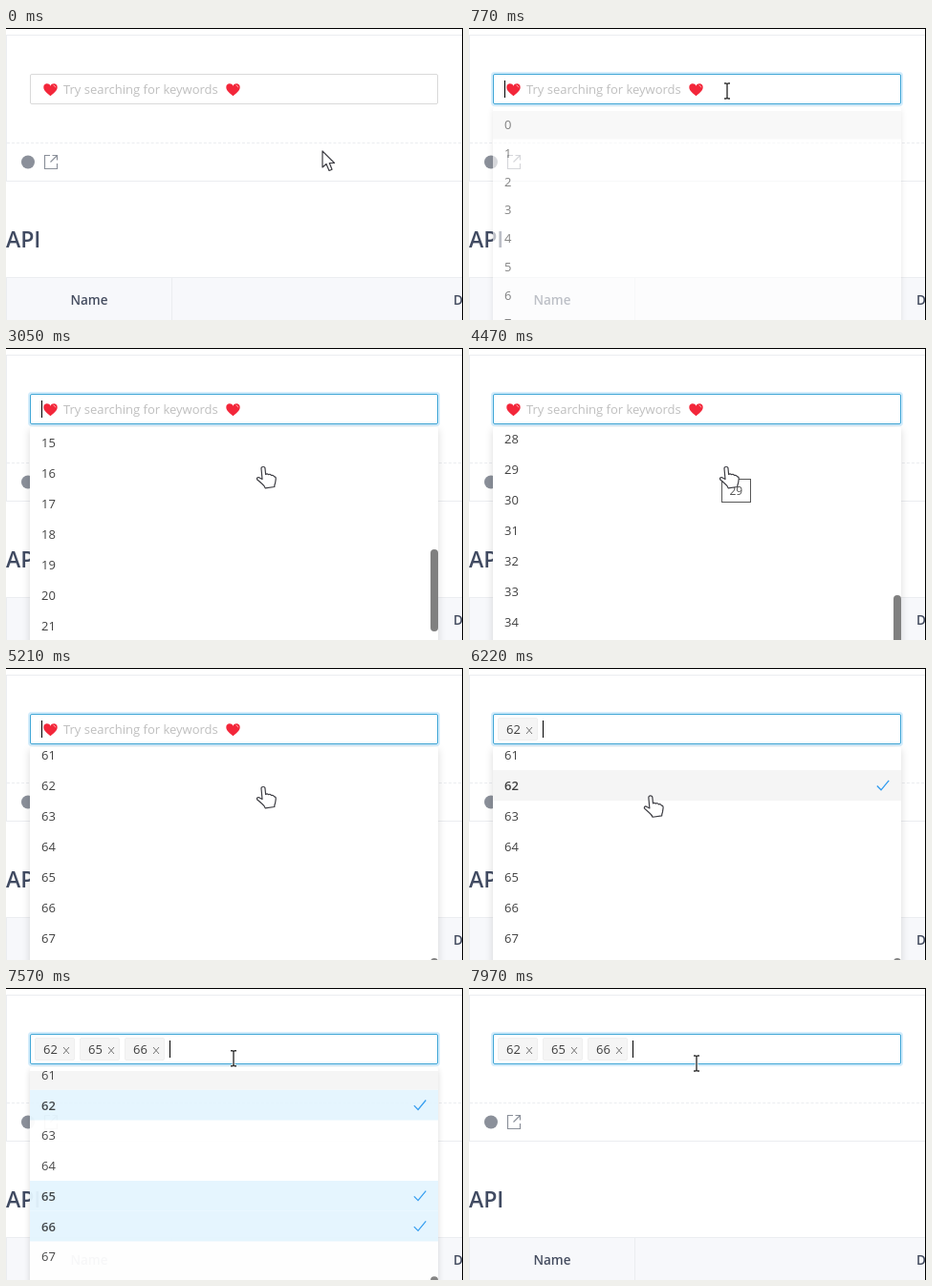
Write an HTML page that moves like this. It is 478 px wide and 306 px high and loops after 8000 ms.

```html
<!DOCTYPE html>
<html lang="en">
<head>
<meta charset="utf-8">
<title>Multi select with endless options</title>
<style>
  html, body { margin: 0; width: 100%; height: 100%; overflow: hidden; background: #fff; }
  #stage { position: relative; width: 478px; height: 306px; overflow: hidden; background: #fff;
    font: 13px/32px "Open Sans", "Noto Sans", sans-serif; color: rgba(0, 0, 0, .75); }
  #stage div, #stage svg, #stage span { position: absolute; box-sizing: border-box; white-space: nowrap; }
  svg { overflow: visible; }

  .card { left: 0; top: 7px; width: 490px; height: 154px; border: 1px solid #ebedf0; }
  .rule { left: 1px; top: 120px; width: 480px; border-top: 1px dashed #ebedf0; }
  .title { left: 0; top: 205px; font-size: 23px; font-weight: 600; color: #414b62; }
  .table { left: 0; top: 261px; width: 490px; height: 60px; background: #f7f8fb; border: 1px solid #ebedf0;
    font-size: 13.5px; font-weight: 600; line-height: 46px; color: #454d60; }
  .table .name { left: 0; width: 173px; height: 60px; text-align: center; border-right: 1px solid #ebedf0; }
  .table .desc { left: 467px; }

  #input { left: 25px; top: 48px; width: 427px; height: 32px; border: 1px solid #d9d9d9; border-radius: 2px;
    background: #fff; transition: none; }
  #input.hover { border-color: #4aaee0; }
  #input.focus { border-color: #3fa6d6; box-shadow: 0 0 0 2px #d3ecfb; }
  #hint { left: 0; top: 48px; width: 300px; height: 32px; }
  #hint span { left: 60px; color: #bfbfbf; }
  .tag { top: 52px; width: 42px; height: 24px; background: #f5f5f5; border: 1px solid #efefef; border-radius: 2px;
    line-height: 22px; padding-left: 8px; }
  .tag svg { left: 28px; top: 8px; }
  #caret { top: 55px; width: 1px; height: 18px; background: #000; }

  #menu { left: 25px; top: 83px; width: 427px; height: 264px; background: #fff; border-radius: 2px;
    box-shadow: 0 2px 8px rgba(0, 0, 0, .15); transform-origin: 50% 0; }
  #list { left: 0; top: 4px; width: 427px; height: 256px; overflow: hidden; }
  .row { left: 0; width: 427px; height: 32px; padding-left: 12px; }
  .row svg { left: 401px; top: 10px; display: none; }
  .row.picked { background: #e4f5fe; font-weight: 600; }
  .row.picked svg { display: block; }
  .row.active { background: #f5f5f5; }
  #thumb { right: 0; width: 8px; border-radius: 4px; background: #808080; }

  #tip { left: 264px; top: 137px; height: 25px; padding: 0 7.5px; border: 1px solid #575757; background: #fff;
    font-size: 12px; line-height: 23px; color: #555; }
  #mouse { left: 0; top: 0; }
  #mouse path { fill: #fff; stroke: #3c3c42; stroke-width: 1.2; stroke-linejoin: round; }
  #mouse #beam { fill: none; stroke: #333; }
  .edge { background: #000; }
</style>
</head>
<body>
<div id="stage">
  <div class="card"></div>
  <div class="rule"></div>
  <svg width="60" height="160" fill="none" stroke="#8b909a" stroke-width="1.2">
    <circle cx="23" cy="140.5" r="7" fill="#8b909a" stroke="none"/>
    <path d="M46 133.5H40.5V147.5H53.5V142M48.5 133.5H53.5V138.5M53.5 133.5L46.5 140.5"/>
  </svg>
  <div class="title">API</div>
  <div class="table"><div class="name">Name</div><div class="desc">D</div></div>

  <div id="input"></div>
  <div id="hint">
    <svg width="300" height="32">
      <defs>
        <g id="heart">
          <path fill="#f3263a" d="M0 6.8C-3 4.2-7.2 1.4-7.2-2.4C-7.2-6.8-1.6-7.4 0-3.8C1.6-7.4 7.2-6.8 7.2-2.4C7.2 1.4 3 4.2 0 6.8Z"/>
          <path fill="none" stroke="#ff9a9c" stroke-linecap="round" d="M3.4-4.4Q5-4.1 5.2-2.6"/>
        </g>
      </defs>
      <use href="#heart" x="46.5" y="16.5"/>
      <use href="#heart" x="237.5" y="16.5"/>
    </svg>
    <span>Try searching for keywords</span>
  </div>
  <div id="tags"></div>
  <div id="caret"></div>

  <div id="menu"><div id="list"></div><div id="thumb"></div></div>
  <div class="edge" style="left:0;top:0;width:478px;height:1px"></div>
  <div class="edge" style="left:477px;top:0;width:1px;height:306px"></div>
  <div id="tip"></div>
  <svg id="mouse" width="24" height="24">
    <path id="arrow" d="M0 0V17L4 13.5L7 20.5L10 19.2L7.3 12.5H12.5Z"/>
    <path id="hand" d="M-2 1.8Q-2 0 0 0T2 1.8L2.6 8Q4 6.6 5.6 8.2Q7 7 8.6 9Q10.4 8.2 11.6 10.3Q13.4 10 13.2 13L12.6 17Q11.6 19.5 11.8 21L2.2 22.3Q1.5 20-1.5 17.5L-6.4 13.2Q-7 11-4.8 11L-1 13Z"/>
    <g id="beam">
      <path style="stroke:#fff;stroke-width:3" d="M-2.5-8H2.5M0-8V8M-2.5 8H2.5"/>
      <path style="fill:none;stroke:#333;stroke-width:1.4" d="M-3-8H-1L0-7L1-8H3M0-7V7M-3 8H-1L0 7L1 8H3"/>
    </g>
  </svg>
</div>
<script>
const LOOP = 8000, ROW = 32, VIEW = 256, LIST_TOP = 87;
const OPEN = 690, CLOSE = 7530, FADE = 200, BLINK = 530;

// [time, x, y]
const path = [[40, 331, 129], [490, 270, 66], [900, 270, 66], [1380, 269, 124.5], [5900, 269, 124.5],
  [6060, 205, 121], [6160, 195, 124], [6450, 150, 211], [6560, 149, 213], [6670, 148, 238], [6800, 148, 249],
  [7000, 148, 249.5], [7120, 156, 275], [7460, 238, 73], [7970, 238, 79]];
// [time, scroll offset]: one wheel notch is 100, held back at the end of each loaded page
const wheel = [[0, 0], [1510, 64], [1600, 164], [1700, 264], [2520, 364], [2600, 384], [2930, 484],
  [3210, 584], [3260, 684], [3320, 704], [3440, 804], [3500, 904],
  [4510, 1024], [4570, 1124], [4640, 1224], [4720, 1344],
  [4970, 1444], [5010, 1544], [5060, 1664], [5110, 1764], [5160, 1864], [5210, 1964]];
const picks = [[6130, 62], [6520, 65], [6860, 66]];
const tips = [[2320, 2520, 9], [3930, 4510, 29], [5560, 5900, 62]];
const blinkStarts = [730, ...picks.map(p => p[0]), CLOSE];

const $ = id => document.getElementById(id);
const clamp = (v, lo = 0, hi = 1) => Math.min(hi, Math.max(lo, v));
const show = (el, on) => { el.style.visibility = on ? "inherit" : "hidden"; };
const latest = (steps, t) => steps.filter(s => s[0] <= t).pop();

const add = (parent, cls, html) => {
  const el = document.createElement("div");
  el.className = cls;
  el.innerHTML = html;
  return parent.appendChild(el);
};
const check = '<span></span><svg width="14" height="12" fill="none" stroke="#2f9bf0" stroke-width="1.3"><path d="M.8 6.5L5 10.8L13.2 .8"/></svg>';
const rows = Array.from({ length: 9 }, () => add($("list"), "row", check));
const tags = picks.map(([, label], i) => {
  const tag = add($("tags"), "tag", label +
    '<svg width="8" height="8" stroke="#777"><path d="M1 1L7 8M7 1L1 8"/></svg>');
  tag.style.left = 30 + 47 * i + "px";
  return tag;
});

function mouseAt(t) {
  const next = path.findIndex(p => p[0] > t);
  if (next === 0) return path[0].slice(1);
  if (next < 0) return path[path.length - 1].slice(1);
  const [a, b] = [path[next - 1], path[next]];
  const k = (t - a[0]) / (b[0] - a[0]);
  const ease = k * k * (3 - 2 * k);
  return [a[1] + (b[1] - a[1]) * ease, a[2] + (b[2] - a[2]) * ease];
}

function drawMenu(t, mouseY, picked) {
  const shown = t < CLOSE ? clamp((t - OPEN) / FADE) : clamp(1 - (t - CLOSE) / FADE);
  const eased = 1 - (1 - shown) ** 2;
  const menu = $("menu");
  show(menu, shown > 0);
  menu.style.opacity = eased;
  menu.style.transform = `scaleY(${.8 + .2 * eased})`;

  const scroll = latest(wheel, t)[1];
  const first = Math.floor(scroll / ROW);
  const pointing = t < 1510 || t >= 5900;
  const active = t < 1510 && mouseY < LIST_TOP ? 0
    : Math.floor((Math.max(mouseY, LIST_TOP) - LIST_TOP + scroll) / ROW);
  rows.forEach((row, i) => {
    const value = first + i;
    row.style.top = value * ROW - scroll + "px";
    row.firstChild.textContent = value;
    row.classList.toggle("picked", picked.includes(value));
    row.classList.toggle("active", pointing && value === active);
  });

  // Rows not yet rendered count with an estimated height of 24
  const count = 10 * Math.max(1, Math.ceil((scroll + VIEW) / 320));
  const measured = Math.min(count, Math.ceil((scroll + VIEW) / ROW) + 1);
  const range = measured * ROW + (count - measured) * 24 - VIEW;
  const size = Math.min(VIEW / 2, VIEW * 10 / count);
  show($("thumb"), t >= 1510);
  $("thumb").style.height = size + "px";
  $("thumb").style.top = 4 + clamp(scroll / range) * (VIEW - size) + "px";
}

function draw(t) {
  const [x, y] = mouseAt(t);
  const picked = picks.filter(p => p[0] <= t).map(p => p[1]);
  const inInput = x > 25 && x < 452 && y > 48 && y < 80;
  const inMenu = t >= OPEN && t < CLOSE && y >= 83;

  $("input").className = t >= OPEN ? "focus" : inInput ? "hover" : "";
  show($("hint"), !picked.length);
  tags.forEach((tag, i) => show(tag, i < picked.length));

  const start = blinkStarts.filter(s => s <= t).pop();
  show($("caret"), start !== undefined && (t - start) % (2 * BLINK) < BLINK);
  $("caret").style.left = (picked.length ? 30 + 47 * picked.length : 37) + "px";

  drawMenu(t, y, picked);

  const tip = tips.find(([from, to]) => t >= from && t < to);
  show($("tip"), tip);
  if (tip) {
    $("tip").textContent = tip[2];
    $("tip").style.opacity = clamp((t - tip[0]) / 120);
  }

  $("mouse").style.transform = `translate(${x}px, ${y}px)`;
  show($("beam"), inInput);
  show($("hand"), inMenu && !inInput);
  show($("arrow"), !inMenu && !inInput);
}

const origin = performance.now();
function tick() {
  draw((performance.now() - origin) % LOOP);
  requestAnimationFrame(tick);
}
tick();
</script>
</body>
</html>
```
